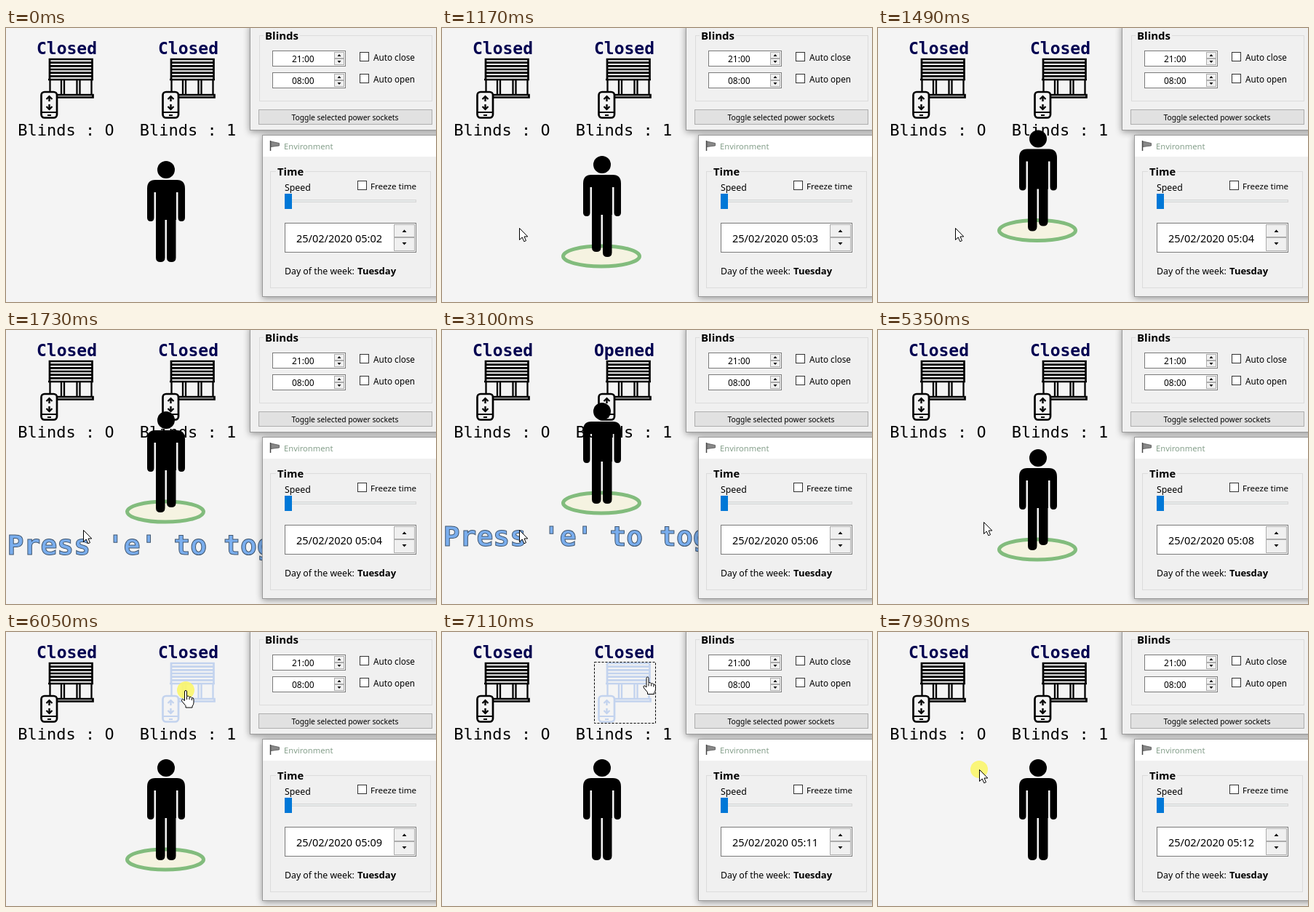
Animation of 591x377 px, one loop 8000 ms. Source, as an HTML page:

```html
<!DOCTYPE html>
<html lang="en">
<head>
<meta charset="utf-8">
<title>Blinds simulator</title>
<style>
html, body { margin: 0; width: 100%; height: 100%; overflow: hidden; background: #f4f4f4; }
svg { display: block; width: 591px; height: 377px; font-family: "Noto Sans", "Open Sans", sans-serif; }
text { white-space: pre; }
.mono { font-family: "DejaVu Sans Mono", monospace; font-size: 22px; text-anchor: middle; }
.state { font-size: 23px; font-weight: bold; fill: #000050; }
.hint { font-size: 38px; font-weight: bold; fill: #7aaeee; stroke: #40566f; stroke-width: 1; }
.window { fill: #f0f0f0; stroke: #9a9a9a; filter: drop-shadow(0 2px 5px rgba(0, 0, 0, .4)); }
.box { fill: #fff; stroke: #7a7a7a; }
.check { fill: #fff; stroke: #333; }
.group { fill: none; stroke: #dcdcdc; }
.btn { fill: #f0f0f0; stroke: #acacac; }
.bold { font-weight: bold; }
</style>
</head>
<body>
<svg viewBox="0 0 591 377" xmlns="http://www.w3.org/2000/svg">
  <defs>
    <g id="blind" fill="none" stroke="currentColor" stroke-width="2.7">
      <path d="M60 71V43H118.500V71M60 47.700H118M60 52.300H118M60 57H118M60 61.700H118M60 66.300H118M58 71H120"/>
      <path d="M60.500 71V88M76 71V92M80 71V92M97.500 71V92M101.500 71V92M117.500 71V92" stroke-width="2.300"/>
      <path d="M71 92H119.500V95.500H71"/>
      <rect x="48.500" y="88" width="21.500" height="35.500" rx="4.500"/>
      <path d="M49 116H70M57 120H62" stroke-width="2"/>
      <path d="M59.500 94V101M59.500 105V112" stroke-width="2.400"/>
      <path d="M55.500 98L59.500 94L63.500 98M55.500 108L59.500 112L63.500 108" stroke-width="2.200"/>
    </g>
    <g id="spin">
      <rect class="box" x=".5" y=".5" width="100" height="21"/>
      <rect class="btn" x="85.500" y="2.500" width="13" height="8"/>
      <rect class="btn" x="85.500" y="11.500" width="13" height="8"/>
      <path d="M89.500 8L92 5L94.500 8ZM89.500 14L92 17L94.500 14Z"/>
    </g>
    <rect id="check" class="check" x=".5" y=".5" width="12" height="12"/>
  </defs>

  <rect width="591" height="377" fill="#f4f4f4"/>
  <g class="mono">
    <text class="state" x="83.500" y="36">Closed</text>
    <text class="state" id="state" x="250.500" y="36">Closed</text>
    <text x="82.500" y="148">Blinds : 0</text>
    <ellipse cx="142.100" cy="140" rx="2.200" ry="3.600" fill="#f4f4f4"/>
    <text x="250" y="148">Blinds : 1</text>
  </g>
  <use href="#blind" color="#000"/>
  <use href="#blind" id="target" x="167"/>
  <rect id="dash" x="209.500" y="41.500" width="84" height="84" fill="none" stroke="#000" stroke-dasharray="3 2"/>

  <g id="person">
    <ellipse id="ring" cx="219" cy="138" rx="52.500" ry="14" fill="#f5f3e1" stroke="#82bc7d" stroke-width="5"/>
    <circle cx="220" cy="12" r="12"/>
    <path d="M205 26H235Q246 26 246 38V78Q246 83 241 83Q236.500 83 236.500 78V43H234V81H206V43H203.500V78Q203.500 83 199 83Q194 83 194 78V38Q194 26 205 26Z"/>
    <path id="legL"/>
    <path id="legR"/>
    <text id="hint" class="mono hint" x="219" y="197">Press 'e' to toggle</text>
  </g>

  <!-- upper window -->
  <rect class="window" x="335.500" y="-5" width="270" height="145.500"/>
  <rect class="group" x="348.500" y="10.500" width="237" height="90"/>
  <rect x="354" y="2" width="50" height="17" fill="#f0f0f0"/>
  <text class="bold" x="356" y="16" font-size="15">Blinds</text>
  <use href="#spin" x="366" y="31"/>
  <use href="#spin" x="366" y="61"/>
  <g font-size="12">
    <text x="393" y="47">21:00</text>
    <text x="393" y="77">08:00</text>
  </g>
  <use href="#check" x="486" y="33"/>
  <use href="#check" x="486" y="63"/>
  <g font-size="11.700">
    <text x="505" y="45">Auto close</text>
    <text x="505" y="75">Auto open</text>
  </g>
  <rect x="347.500" y="112.500" width="238" height="20" fill="#e1e1e1" stroke="#adadad"/>
  <text x="466" y="127" font-size="10.300" text-anchor="middle">Toggle selected power sockets</text>

  <!-- lower window -->
  <rect class="window" x="352.500" y="147.500" width="260" height="222"/>
  <rect x="353" y="148" width="240" height="29" fill="#fff"/>
  <path d="M363.500 155V169" stroke="#444" stroke-width="1.500"/>
  <path d="M364 156L375.500 158.500V162L364 163.500Z" fill="#888" stroke="#555" stroke-width=".8"/>
  <text x="382" y="167" font-size="11.200" fill="#86a08c">Environment</text>
  <rect class="group" x="363.500" y="197.500" width="220" height="160"/>
  <rect x="371" y="189" width="40" height="17" fill="#f0f0f0"/>
  <text class="bold" x="373" y="203" font-size="14.700">Time</text>
  <text x="383" y="224" font-size="12.300">Speed</text>
  <use href="#check" x="483" y="210"/>
  <text x="501" y="222" font-size="11.600">Freeze time</text>
  <rect x="383.500" y="236.500" width="180" height="3" fill="#e7eaea" stroke="#d6d6d6"/>
  <rect x="383" y="228" width="10" height="21" fill="#0078d7"/>
  <rect class="box" x="383.500" y="268.500" width="180" height="40"/>
  <rect class="btn" x="533.500" y="270.500" width="28" height="17"/>
  <rect class="btn" x="533.500" y="288.500" width="28" height="18"/>
  <path d="M544.500 281L547.500 277.500L550.500 281ZM544.500 295L547.500 298.500L550.500 295Z"/>
  <text id="clock" x="399" y="294.500" font-size="14.500"></text>
  <text x="383" y="339" font-size="12.300">Day of the week:</text>
  <text class="bold" x="483" y="339" font-size="13">Tuesday</text>

  <g id="cursor">
    <circle id="click" r="12" fill="#faf56e" fill-opacity=".92"/>
    <path id="arrow" d="M.5 .5V16.500L4.200 13L6.800 18.800L9.500 17.600L7 12H11.800Z" fill="#fff" stroke="#000"/>
    <path id="hand" d="M-1.500 2Q-1.500 .5 0 .5T1.500 2V8.500Q4 7 5 9.500Q7.500 8.500 8.300 10.500Q11 10 11 13V17Q11 20 9 22V24H0V21.500L-5 15.500Q-6.500 13 -4.500 12.200L-1.500 14.500ZM1.500 9V13M5 10V13M8.300 11V14" fill="#fff" stroke="#000"/>
  </g>
</svg>
<script>
const LOOP = 8000;
const TICKS = [680, 1480, 2290, 3100, 3910, 4670, 5450, 6290, 7110, 7930];
const PATH = [
  [50, 330, 328], [180, 278, 266], [300, 226, 231], [410, 226, 231], [680, 106, 275],
  [5170, 106, 275], [5350, 145, 264], [5660, 200, 165], [5910, 244, 84], [5980, 247, 80],
  [6230, 247, 80], [6430, 282.5, 61.5], [7130, 282.5, 61.5], [7500, 215, 132], [7880, 143, 190], [7930, 139, 189]
];
const CLICKS = [[300, 360], [6050, 6100], [7930, 8000]];
const RUNS = [[1170, 1870], [3910, 4350], [5290, 5470]];

const $ = id => document.getElementById(id);
const within = (t, [a, b]) => t >= a && t < b;
const show = (id, on) => $(id).setAttribute("display", on ? "inline" : "none");
const steps = (t, start, gap) => Math.floor((t - start) / gap);

function cursorAt(t) {
  let i = 0;
  while (i < PATH.length - 1 && t >= PATH[i + 1][0]) i++;
  const [t0, x0, y0] = PATH[i];
  const [t1, x1, y1] = PATH[i + 1] || [LOOP, x0, y0];
  const k = Math.max(0, steps(t, t0, 62)) * 62 / (t1 - t0);
  return [x0 + (x1 - x0) * k, y0 + (y1 - y0) * k];
}

// y of the top of the head
function personAt(t) {
  if (t < 1170) return 183;
  if (t < 3910) return Math.max(100, 176 - 7.1 * steps(t, 1170, 62.2));
  if (t < 5290) return Math.min(160, 100 + 7.75 * (steps(t, 3910, 60) + 1));
  if (t < 5410) return 164;
  return t < 5470 ? 171 : 175;
}

function leg(x, end) {
  const r = x + 12.5;
  return `M${x} 80H${r}V${end - 6}Q${r} ${end} ${x + 6.25} ${end}T${x} ${end - 6}Z`;
}

function draw(t) {
  const y = personAt(t);
  const run = RUNS.find(r => within(t, r));
  let left = 139, right = 139;
  if (run) {
    const leftDown = run[0] > 5000 || steps(t, run[0], 300) % 2 === 1;
    if (leftDown) right -= 7; else left -= 7;
  }
  $("person").setAttribute("transform", `translate(0 ${y})`);
  $("legL").setAttribute("d", leg(206, left));
  $("legR").setAttribute("d", leg(221, right));
  show("ring", t >= 300 && t < 6290);
  show("hint", y < 125);

  const [cx, cy] = cursorAt(t);
  const hover = t > 5000 && cx > 208 && cx < 294 && cy > 41 && cy < 126;
  $("cursor").setAttribute("transform", `translate(${cx} ${cy})`);
  show("cursor", t >= 50);
  show("arrow", !hover);
  show("hand", hover);
  show("click", CLICKS.some(c => within(t, c)));

  $("target").setAttribute("color", hover ? "#c3d3ee" : "#000");
  show("dash", t >= 6290 && t < 7930);
  $("state").textContent = within(t, [2170, 3350]) ? "Opened" : "Closed";

  const minute = 2 + TICKS.filter(s => t >= s).length;
  $("clock").textContent = "25/02/2020 05:" + String(minute).padStart(2, "0");
}

const start = performance.now();
function frame() {
  draw((performance.now() - start) % LOOP);
  requestAnimationFrame(frame);
}
frame();
</script>
</body>
</html>
```
